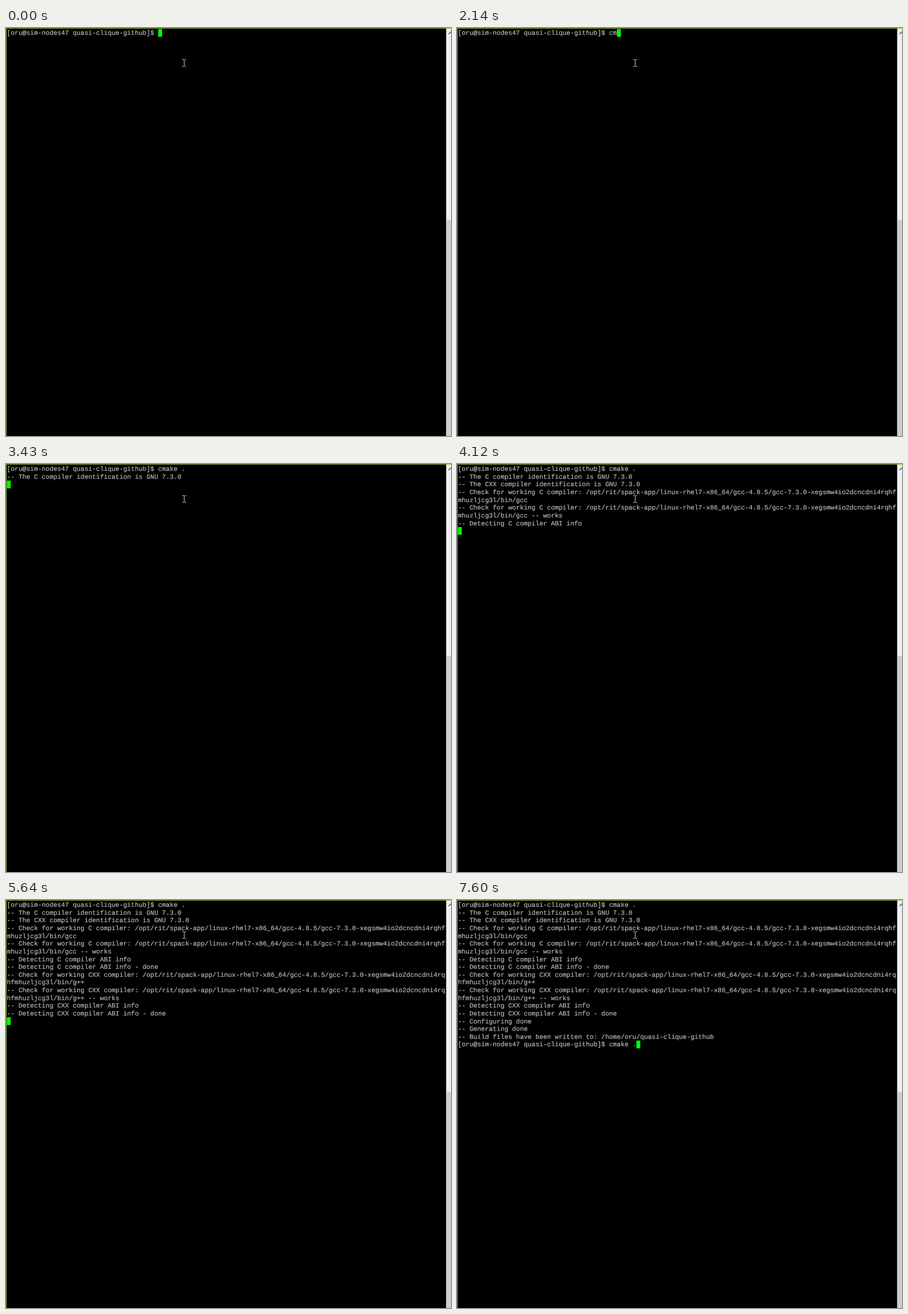
An HTML page for the animation above (8 s loop, 781 by 717 pixels).

```html
<!DOCTYPE html>
<html lang="en">
<head>
<meta charset="utf-8">
<title>Terminal</title>
<style>
  html, body { margin: 0; width: 100%; height: 100%; overflow: hidden; background: #000; }
  svg { display: block; width: 781px; height: 717px; }
  text {
    font: 11.352px "Liberation Mono", "Courier New", monospace;
    fill: #bbb; stroke: #bbb; stroke-width: .2px;
    white-space: pre; text-rendering: geometricPrecision;
  }
</style>
</head>
<body>
<svg viewBox="0 0 781 717">
  <rect width="781" height="717"/>
  <g id="rows"></g>
  <rect id="caret" fill="#0f0"/>
  <g id="pointer" fill="none" stroke="#e4e4e4">
    <path d="M309.5 55.5H312M313.5 55.5H316M312.8 56V67M309.5 67.5H312M313.5 67.5H316"/>
  </g>
  <g id="scrollbar">
    <rect x="772.5" width="8.5" height="717" fill="#f0f0f0"/>
    <rect x="773.5" y="337" width="7.5" height="380" fill="#cdcdcd"/>
    <path d="M776.7 10.8L781 6.5" fill="none" stroke="#505050" stroke-width="1.6"/>
  </g>
  <path d="M0 .5H781M.5 0V717" fill="none" stroke="#7fb02a"/>
</svg>
<script>
const LOOP = 8000, COLS = 113, LEFT = 1.5, TOP = 1.9, CELL_W = 6.811, CELL_H = 13.62;
const USER = 'oru', HOST = 'sim-nodes47', DIR = 'quasi-clique-github';
const PROMPT = `[${USER}@${HOST} ${DIR}]$ `;
const BIN = '/opt/rit/spack-app/linux-rhel7-x86_64/gcc-4.8.5/gcc-7.3.0-xegsmw4io2dcncdni4rqhfmhuzljcg3l/bin/';

const check = (lang, tool) => `-- Check for working ${lang} compiler: ${BIN}${tool}`;
const detect = lang => `-- Detecting ${lang} compiler ABI info`;

// [time, typed command]
const firstTyping = [
  [0, ''], [500, 'c'], [620, 'cn'], [770, 'cnaj'], [890, 'cnaje'],
  [1320, 'cnaj'], [1440, 'cna'], [1560, 'cn'], [1710, 'c'],
  [2140, 'cm'], [2260, 'cma'], [2400, 'cmak'], [2520, 'cmake'],
  [2640, 'cmake '], [2760, 'cmake .']
];
const secondTyping = [
  [6070, ''], [6930, 'c'], [7050, 'cma'], [7180, 'cmak'],
  [7320, 'cmake'], [7450, 'cmake '], [7600, 'cmake .']
];
// [time, lines printed then]
const output = [
  [3430, '-- The C compiler identification is GNU 7.3.0'],
  [3680, '-- The CXX compiler identification is GNU 7.3.0', check('C', 'gcc')],
  [4120, check('C', 'gcc') + ' -- works', detect('C')],
  [4560, detect('C') + ' - done', check('CXX', 'g++')],
  [5110, check('CXX', 'g++') + ' -- works', detect('CXX')],
  [5640, detect('CXX') + ' - done'],
  [5790, '-- Configuring done'],
  [5940, '-- Generating done'],
  [6070, `-- Build files have been written to: /home/${USER}/${DIR}`]
];
const ENTER = 3160, PROMPT_BACK = 6070;

const svgNS = 'http://www.w3.org/2000/svg';
const rowGroup = document.getElementById('rows');
const caret = document.getElementById('caret');
caret.setAttribute('width', CELL_W);
caret.setAttribute('height', CELL_H);

const rowNodes = Array.from({ length: 19 }, (_, i) => {
  const node = document.createElementNS(svgNS, 'text');
  node.setAttribute('x', LEFT);
  node.setAttribute('y', TOP + i * CELL_H + 10.3);
  return rowGroup.appendChild(node);
});

const typedAt = (keys, t) => keys.filter(k => k[0] <= t).pop()[1];

function wrap(line) {
  const parts = [];
  for (let i = 0; i < line.length; i += COLS) parts.push(line.slice(i, i + COLS));
  return parts.length ? parts : [''];
}

function screenAt(t) {
  const lines = [PROMPT + typedAt(firstTyping, t)];
  for (const [time, ...printed] of output) if (time <= t) lines.push(...printed);
  if (t >= PROMPT_BACK) lines.push(PROMPT + typedAt(secondTyping, t));
  else if (t >= ENTER) lines.push('');
  return lines.flatMap(wrap);
}

function draw(t) {
  const rows = screenAt(t);
  rowNodes.forEach((node, i) => {
    const line = rows[i] || '';
    if (node.textContent !== line) node.textContent = line;
  });
  const last = rows.length - 1;
  caret.setAttribute('x', LEFT + rows[last].length * CELL_W);
  caret.setAttribute('y', TOP + last * CELL_H);
}

const start = performance.now();
function tick() {
  draw((performance.now() - start) % LOOP);
  requestAnimationFrame(tick);
}
tick();
</script>
</body>
</html>
```
